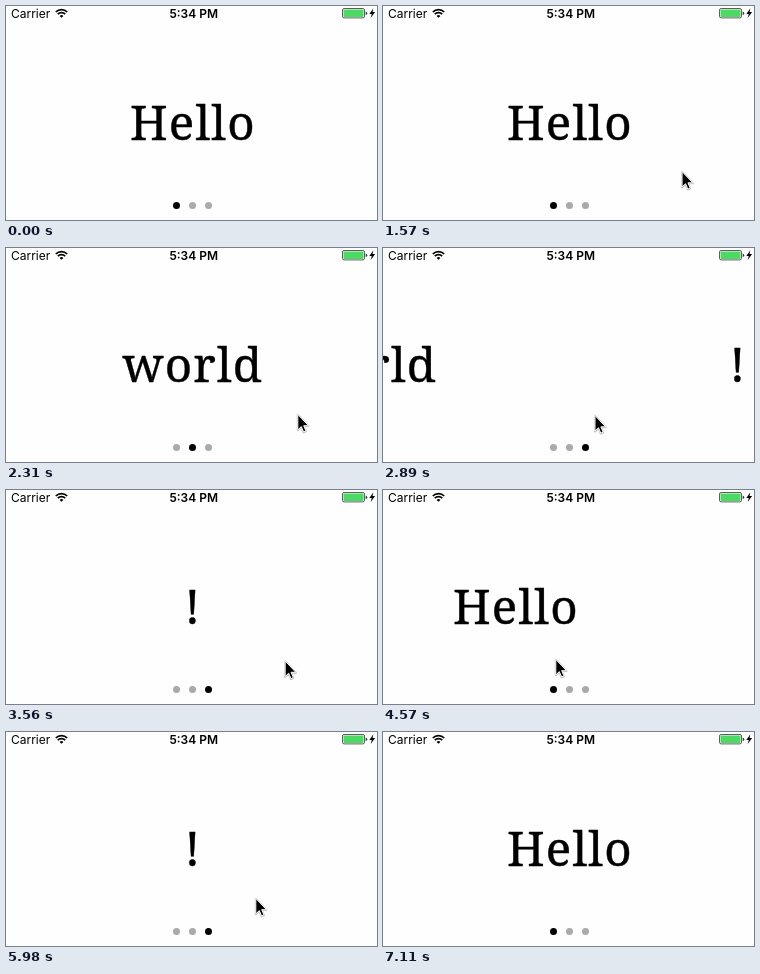
An HTML page for the animation above (7.53 s loop, 371 px wide and 214 px high).

```html
<!DOCTYPE html>
<html lang="en">
<head>
<meta charset="utf-8">
<title>Endless pager</title>
<style>
  html, body { margin: 0; width: 100%; height: 100%; overflow: hidden; background: #fefefe; }
  svg { display: block; width: 100vw; height: 100vh; }
  .status { font: 12px Inter, "Liberation Sans", sans-serif; }
  .time { font-weight: 600; }
  .word {
    font: 300 47.5px "Noto Serif", "Liberation Serif", serif;
    letter-spacing: 1.2px;
    text-anchor: middle;
    stroke: #000; stroke-width: .4; stroke-linejoin: round;
  }
</style>
</head>
<body>
<svg viewBox="0 0 371 214">
  <g class="status">
    <text x="5" y="12">Carrier</text>
    <text class="time" x="187.7" y="12" text-anchor="middle">5:34 PM</text>
  </g>
  <g fill="none" stroke="#000" stroke-width="1.7">
    <path d="M49.8 6a8 8 0 0 1 11.4 0M51.8 8.2a5.2 5.2 0 0 1 7.4 0"/>
    <path d="M55.5 11.8l-1.9-1.9a2.7 2.7 0 0 1 3.8 0z" fill="#000" stroke="none"/>
  </g>
  <rect x="336.5" y="2.5" width="22" height="9.4" rx="1.6" fill="none" stroke="#333" stroke-width=".8"/>
  <rect x="337.5" y="3.5" width="20" height="7.4" rx=".7" fill="#4cd964"/>
  <path d="M359.7 5.4q1.5.4 1.5 1.8t-1.5 1.8z" fill="#333"/>
  <path d="M367.4 2.2l-4.1 5.7h2.5l-1.1 4.1 4.4-5.9h-2.6z"/>

  <text class="word" id="now" y="133.6"></text>
  <text class="word" id="next" y="133.6"></text>

  <g id="dots">
    <circle cx="170.5" cy="199.5" r="3.5"/>
    <circle cx="186.5" cy="199.5" r="3.5"/>
    <circle cx="202.5" cy="199.5" r="3.5"/>
  </g>

  <g id="pointer">
    <path d="M.8 1.8V17.3L4.3 14 6.6 19.4 9 18.4 6.7 13.1H11.5z" stroke="#000" stroke-width="2" stroke-linejoin="round" opacity=".25"/>
    <path d="M.8 1.4V16.9L4.3 13.6 6.6 19 9 18 6.7 12.7H11.5z" stroke="#fff" stroke-width="1"/>
  </g>
</svg>
<script>
const LOOP = 7530, WIDTH = 371, CENTER = 186.9, SLACK = 22;
const WORDS = ["Hello", "world", "!"];
const ENTRY = { from: 300, to: 700, steps: 14, start: [324, 213], end: [306, 165] };

// drag and snap: [start ms, end ms, steps]
// pull: offset when the drag stops, fling: offset when the snap becomes visible
const SWIPES = [
  { drag: [1570, 1730, 7], pull: 96, snap: [1940, 2310, 13], fling: 205, rest: [291, 165] },
  { drag: [2610, 2720, 5], pull: 77, snap: [2890, 3270, 10], fling: 203, rest: [293, 171] },
  { drag: [3560, 3640, 4], pull: 80, snap: [3820, 4190, 11], fling: 215, rest: [248, 168] },
  { drag: [4490, 4570, 4], pull: 54, snap: [4780, 5140, 12], fling: 195, rest: [276, 168] },
  { drag: [5350, 5450, 5], pull: 91, snap: [5630, 5980, 9], fling: 218, rest: [249, 165] },
  { drag: [6370, 6470, 5], pull: 68, snap: [6650, 7110, 14], fling: 210, rest: [245, 215] }
];

const el = id => document.getElementById(id);
const now = el("now"), next = el("next"), pointer = el("pointer");
const dots = [...el("dots").children];

const mix = (a, b, p) => a + (b - a) * p;
const mixPoint = (a, b, p) => [mix(a[0], b[0], p), mix(a[1], b[1], p)];
const easeOut = p => 1 - (1 - p) ** 2;
const settle = p => (1 - Math.exp(-5 * p)) / (1 - Math.exp(-5));

// index of the current step, -1 before the first one
function stepAt(t, [from, to, steps]) {
  if (t < from) return -1;
  return Math.min(steps - 1, Math.floor((t - from) / (to - from) * (steps - 1) + 1e-6));
}

function stateAt(t) {
  const { from, to, steps, start, end } = ENTRY;
  const entered = (stepAt(t, [from, to, steps]) + 1) / steps;
  let page = 0, offset = 0, tip = mixPoint(start, end, easeOut(entered));

  for (const { drag, pull, snap, fling, rest } of SWIPES) {
    const d = stepAt(t, drag);
    if (d < 0) break;
    const travel = (pull + SLACK) * ((d + 1) / drag[2]) ** 1.4;
    tip = [tip[0] - travel, tip[1] - 2 * Math.sin(Math.PI * (d + 1) / drag[2])];
    offset = Math.max(0, travel - SLACK);

    const s = stepAt(t, snap);
    if (s < 0) break;
    offset = mix(fling, WIDTH, settle(s / (snap[2] - 1)));
    tip = mixPoint(tip, rest, easeOut((s + 1) / snap[2]));
    if (s < snap[2] - 1) break;
    page++;
    offset = 0;
  }
  return { page, offset, tip, shown: t >= from && t < SWIPES.at(-1).snap[1] };
}

function place(node, word, x) {
  if (node.textContent !== word) node.textContent = word;
  node.setAttribute("x", x.toFixed(2));
}

function draw(t) {
  const { page, offset, tip, shown } = stateAt(t);
  place(now, WORDS[page % 3], CENTER - offset);
  place(next, WORDS[(page + 1) % 3], CENTER + WIDTH - offset);
  const active = (page + Math.round(offset / WIDTH)) % 3;
  dots.forEach((dot, i) => dot.setAttribute("fill", i === active ? "#000" : "#aaa"));
  pointer.setAttribute("transform", `translate(${tip[0].toFixed(2)} ${tip[1].toFixed(2)})`);
  pointer.setAttribute("visibility", shown ? "visible" : "hidden");
}

const begin = performance.now();
function tick() {
  draw((performance.now() - begin) % LOOP);
  requestAnimationFrame(tick);
}
tick();
</script>
</body>
</html>
```
